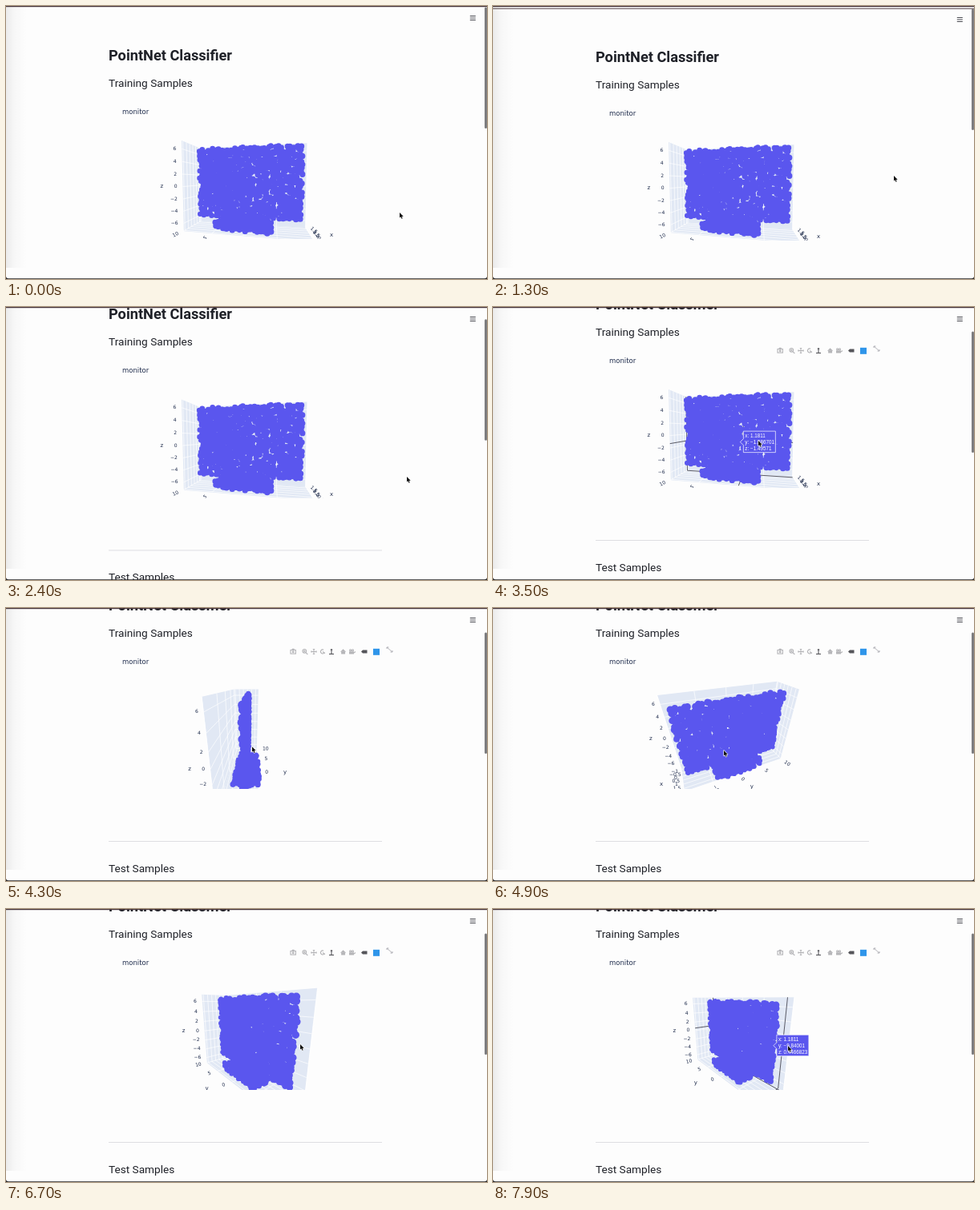
An HTML page with a canvas for the animation above (8 s loop, 600x341 px).

```html
<!DOCTYPE html>
<html lang="en">
<head>
<meta charset="utf-8">
<title>PointNet Classifier</title>
<style>
html, body { margin: 0; width: 100%; height: 100%; overflow: hidden; background: #fdfdfd; }
canvas { display: block; width: 600px; height: 341px; }
</style>
</head>
<body>
<canvas id="stage"></canvas>
<script>
const W = 600, H = 341, LOOP = 8000;
const BLUE = '#5a56ee', INK = '#1f2c4c', HEAD = '#1f2128', EDGE = '#46343a';
const UI = 'Roboto, sans-serif', PLOT = '"DejaVu Sans", sans-serif', HOVER = '"Liberation Sans", sans-serif';

const canvas = document.getElementById('stage');
const ctx = canvas.getContext('2d');
const dpr = window.devicePixelRatio || 1;
canvas.width = W * dpr;
canvas.height = H * dpr;

// Motion

function ease(t, from, to) {
  const k = Math.min(1, Math.max(0, (t - from) / (to - from)));
  return k * k * (3 - 2 * k);
}

const mix = (a, b, k) => a.map((v, i) => v + (b[i] - v) * k);

// Runs through steps of { from, to, pose }, easing from pose to pose
const follow = (t, start, steps) =>
  steps.reduce((pose, s) => mix(pose, s.pose, ease(t, s.from, s.to)), start);

const scrollAt = t => 65 * ease(t, 1800, 2635) - 2 * (ease(t, 800, 1000) - ease(t, 1600, 1800));

const DRAG = { from: 3600, to: 4900 }, BACK = { from: 5000, to: 6700 };

const cursorAt = t => follow(t, [491, 258], [
  { from: 100, to: 600, pose: [500, 212] },
  { from: 2700, to: 3400, pose: [331, 167] },
  { ...DRAG, pose: [288, 178] },
  { ...BACK, pose: [367, 169] },
  { from: 7100, to: 7500, pose: [368, 171] }
]);

// turn and tilt in degrees, eye distance
const eyeAt = t => follow(t, [11, 3, 23.2], [
  { ...DRAG, pose: [157, 35, 23.2] },
  { ...BACK, pose: [50, 14, 23.2] },
  { from: 7100, to: 7600, pose: [50, 16, 26] }
]);

const HOVERS = [
  { from: 3250, to: 3650, u: 1.3, z: -1.3, lines: ['x: 1.1811', 'y: −1.386701', 'z: −1.49571'] },
  { from: 7400, to: 8000, u: 9, z: 0.6, lines: ['x: 1.1811', 'y: −9.84001', 'z: 0.4466823'] }
];

// Point cloud: u runs along the screen, v is depth, z is up

let seed = 11;
const rand = () => (seed = (seed * 16807) % 2147483647) / 2147483647;
const jitter = a => (rand() * 2 - 1) * a;
const cloud = [];

function plate([u0, u1], [v0, v1], [z0, z1], step, loss) {
  for (let u = u0; u <= u1 + 0.01; u += step)
    for (let v = v0; v <= v1 + 0.01; v += step)
      for (let z = z0; z <= z1 + 0.01; z += step) {
        const p = [u + jitter(0.24), v + jitter(0.15), z + jitter(0.24)];
        if (rand() >= loss) cloud.push(p);
      }
}
plate([-8.7, 8.7], [0, 0], [-5.2, 6.5], 0.58, 0.025);
plate([-3.6, 3.8], [0, 0.5], [-6.7, -5.3], 0.5, 0);
plate([-3.6, 4], [-2, 2.2], [-6.9, -6.9], 0.5, 0);
plate([-5, -4.2], [-1.8, 1.8], [-6.8, -6.2], 0.5, 0);

// Plot box

const BU = 9.9, V0 = -2, V1 = 3.4, BZ = 7.3;

function viewAt(t) {
  const [turn, tilt, dist] = eyeAt(t);
  const a = turn * Math.PI / 180, b = tilt * Math.PI / 180;
  const sa = Math.sin(a), ca = Math.cos(a), sb = Math.sin(b), cb = Math.cos(b);
  const P = (u, v, z) => {
    const near = u * sa + v * ca;
    const s = 169 / (dist - near * cb - z * sb);
    return [301 + s * (u * ca - v * sa), 160 - s * (z * cb - near * sb), s];
  };
  const farU = sa > 0 ? -BU : BU, farV = ca > 0 ? V0 : V1;
  return { P, ca, farU, farV, nearU: -farU, nearV: V0 + V1 - farV };
}

function path(pts, x = 0, y = 0) {
  ctx.beginPath();
  pts.forEach(p => ctx.lineTo(x + p[0], y + p[1]));
}

function line(a, b) {
  path([a, b]);
  ctx.stroke();
}

function poly(pts, x, y) {
  path(pts, x, y);
  ctx.closePath();
  ctx.fill();
}

function label(s, x, y, angle = 0, align = 'center') {
  ctx.save();
  ctx.translate(x, y);
  ctx.rotate(angle);
  ctx.textAlign = align;
  ctx.fillText(s, 0, 0);
  ctx.restore();
}

function text(s, x, y, font, color) {
  ctx.font = font;
  ctx.fillStyle = color;
  ctx.fillText(s, x, y);
}

const num = n => String(n).replace('-', '−');

function drawWalls({ P, farU, farV }) {
  ctx.fillStyle = '#e1e8f4';
  poly([P(farU, V0, -BZ), P(farU, V1, -BZ), P(farU, V1, BZ), P(farU, V0, BZ)]);
  poly([P(-BU, farV, -BZ), P(BU, farV, -BZ), P(BU, farV, BZ), P(-BU, farV, BZ)]);
  poly([P(-BU, V0, -BZ), P(BU, V0, -BZ), P(BU, V1, -BZ), P(-BU, V1, -BZ)]);
  ctx.strokeStyle = 'rgba(255,255,255,.85)';
  ctx.lineWidth = 0.8;
  for (let z = -6; z <= 6; z += 2) {
    line(P(farU, V0, z), P(farU, V1, z));
    line(P(-BU, farV, z), P(BU, farV, z));
  }
  for (let u = -10; u <= 10; u += 5) {
    line(P(u, farV, -BZ), P(u, farV, BZ));
    line(P(u, V0, -BZ), P(u, V1, -BZ));
  }
  for (let v = V0 + 0.6; v < V1; v += 0.9) {
    line(P(farU, v, -BZ), P(farU, v, BZ));
    line(P(-BU, v, -BZ), P(BU, v, -BZ));
  }
}

// Point on a floor edge with the direction that leads out of the box
function outward(inner, edge) {
  const dx = edge[0] - inner[0], dy = edge[1] - inner[1], d = Math.hypot(dx, dy) || 1;
  return { x: edge[0], y: edge[1], dx: dx / d, dy: dy / d };
}

function drawAxes({ P, ca, farU, farV, nearU, nearV }) {
  const sides = [[farU, nearV], [nearU, farV]];
  const left = sides.sort((a, b) => P(...a, 0)[0] - P(...b, 0)[0])[0];
  const onY = u => outward(P(u, farV, -BZ), P(u, nearV, -BZ));
  const onX = v => outward(P(farU, v, -BZ), P(nearU, v, -BZ));
  ctx.fillStyle = INK;
  ctx.textBaseline = 'middle';

  ctx.font = '6px ' + PLOT;
  for (let z = -6; z <= 6; z += 2) {
    const p = P(...left, z);
    label(num(z), p[0] - 7, p[1], 0, 'right');
  }
  for (let y = -10; y <= 10; y += 5) {
    const e = onY(-y);
    label(num(y), e.x + e.dx * 11, e.y + e.dy * 9, Math.atan(e.dy / (e.dx || 0.01)) * 0.8);
  }
  for (let x = -1; x <= 1.5; x += 0.5) {
    const e = onX(1.4 - x * 1.6);
    label(num(x), e.x + e.dx * 9, e.y + e.dy * 8, 0.75 * Math.max(0, ca));
  }

  ctx.font = '7px ' + PLOT;
  const z = P(...left, 0), x = onX(0.7), y = onY(0);
  label('z', z[0] - 26, z[1]);
  label('x', x.x + x.dx * 28, x.y + x.dy * 22);
  label('y', y.x + y.dx * 34, y.y + y.dy * 20);
  ctx.textBaseline = 'alphabetic';
}

function drawSpikes({ P, farU, farV }, { u, z }) {
  const v = V0 + 0.3;
  ctx.strokeStyle = '#4a4a55';
  ctx.lineWidth = 0.9;
  line(P(farU, V0, z), P(farU, V1, z));
  line(P(farU, v, -BZ), P(farU, v, BZ));
  line(P(-BU, v, -BZ), P(BU, v, -BZ));
  line(P(u, V0, -BZ), P(u, V1, -BZ));
  line(P(u, farV, -BZ), P(u, farV, BZ));
  line(P(-BU, farV, z), P(BU, farV, z));
}

function drawHover({ P }, h) {
  const [px, py] = P(h.u, 0, h.z);
  const x = px + 2, y = py - 1;
  ctx.fillStyle = BLUE;
  poly([[-4, 0], [0, -4], [0, -13.5], [40, -13.5], [40, 13], [0, 13], [0, 4]], x, y);
  ctx.strokeStyle = '#fff';
  ctx.lineWidth = 0.7;
  ctx.stroke();
  h.lines.forEach((s, i) => text(s, x + 2, y - 5.6 + i * 8.2, '6.3px ' + HOVER, '#fff'));
}

function drawScene(t) {
  const view = viewAt(t);
  const hover = HOVERS.find(h => t >= h.from && t < h.to);
  ctx.save();
  ctx.beginPath();
  ctx.rect(145, 86, 307, 140);
  ctx.clip();
  drawWalls(view);
  drawAxes(view);
  if (hover) drawSpikes(view, hover);
  ctx.fillStyle = BLUE;
  ctx.beginPath();
  for (const p of cloud) {
    const [x, y, s] = view.P(...p), r = 0.5 + 0.4 * s;
    ctx.moveTo(x + r, y);
    ctx.arc(x, y, r, 0, 7);
  }
  ctx.fill();
  if (hover) drawHover(view, hover);
  ctx.restore();
}

// Toolbar

function ring(x, y, r, from = 0, to = 6.3) {
  ctx.beginPath();
  ctx.arc(x, y, r, from, to);
  ctx.stroke();
}

function cross(x, y, r) {
  line([x - r, y], [x + r, y]);
  line([x, y - r], [x, y + r]);
}

function block(x, y, w, h) {
  ctx.fillRect(x - w / 2, y - h / 2, w, h);
}

function drawModebar() {
  const y = 54.5;
  ctx.lineWidth = 1.1;
  ctx.strokeStyle = ctx.fillStyle = '#b5b5b8';
  // snapshot
  block(358.2, y - 3, 3, 1.5);
  ctx.strokeRect(355, y - 2, 6.4, 4.6);
  ring(358.2, y + 0.3, 0.9);
  // zoom
  ring(372.3, y - 0.7, 2.3);
  cross(372.3, y - 0.7, 1.2);
  line([374, y + 1.2], [376.3, y + 3.5]);
  // pan
  cross(384, y, 3.5);
  for (const s of [-1, 1]) {
    block(384 + s * 3, y, 1, 2.4);
    block(384, y + s * 3, 2.4, 1);
  }
  // orbit
  ring(395, y, 2.5, 0.6, 5.2);
  line([395, y], [398, y + 2]);
  // home
  poly([[-3.6, 0.3], [0, -3.2], [3.6, 0.3]], 420.6, y);
  block(420.6, y + 1.5, 4.9, 3);
  // last view
  block(431, y + 1.4, 6, 3.2);
  for (const x of [429.6, 432.5]) ring(x, y - 1.7, 1);
  line([434, y + 1.5], [436, y]);
  // turntable
  ctx.strokeStyle = ctx.fillStyle = '#55555a';
  line([406, y - 3.5], [406, y + 3]);
  line([403, y + 3], [409, y + 3]);
  block(406, y - 2.3, 2.4, 1.2);
  // tag
  poly([[-4, 0], [-2, -2], [3.5, -2], [3.5, 2], [-2, 2]], 447, y);
  ctx.fillStyle = '#2f95ea';
  block(462, y + 0.3, 8, 8);
  // expand
  ctx.strokeStyle = '#aaaab0';
  ctx.lineWidth = 0.9;
  for (const s of [-1, 1]) {
    path([[s, 3 * s], [3.5 * s, 3 * s], [3.5 * s, s]], 478.5, 52);
    ctx.stroke();
  }
  line([475, 49], [482, 55]);
}

// Page and window

function drawPage(t, scroll) {
  ctx.save();
  ctx.translate(0, -scroll);
  text('PointNet Classifier', 128, 67.7, 'bold 18.2px ' + UI, HEAD);
  text('Training Samples', 128, 101, '13.65px ' + UI, HEAD);
  text('monitor', 145, 134.7, '8.5px ' + PLOT, INK);
  text('Test Samples', 128, 395, '13.65px ' + UI, HEAD);
  ctx.fillStyle = '#dedee2';
  ctx.fillRect(128, 356, 341, 1);
  ctx.translate(0, 65);
  drawScene(t);
  if (t >= 2950) drawModebar();
  ctx.restore();
}

function drawBackdrop() {
  ctx.fillStyle = '#262628';
  ctx.fillRect(0, 0, W, H);
  ctx.fillStyle = '#fdfdfd';
  ctx.beginPath();
  ctx.roundRect(0, 0, W, H - 0.8, [0, 0, 3, 3]);
  ctx.fill();
  const shade = ctx.createLinearGradient(0, 0, 26, 0);
  shade.addColorStop(0, 'rgba(0,0,0,.07)');
  shade.addColorStop(0.4, 'rgba(0,0,0,.025)');
  shade.addColorStop(1, 'rgba(0,0,0,0)');
  ctx.fillStyle = shade;
  ctx.fillRect(0, 0, 26, 327);
}

function drawChrome(t, scroll) {
  const push = Math.max(0, -scroll);
  ctx.strokeStyle = '#4a4b52';
  ctx.lineWidth = 1;
  for (const dy of [-2.5, 0, 2.5]) line([578.8, 15 + push + dy], [585.8, 15 + push + dy]);

  // the thumb lags behind the page
  const thumb = Math.max(0, scrollAt(t - 200)) * 0.448;
  ctx.fillStyle = '#7d7d7f';
  ctx.beginPath();
  ctx.roundRect(597, 1.5 + push + thumb, 3, 151.5, 1.5);
  ctx.fill();

  ctx.fillStyle = EDGE;
  ctx.fillRect(0, 0, W, 1.2);
  if (push > 0.5) ctx.fillRect(0, push + 0.8, W, 0.9);
}

function drawCursor(x, y) {
  ctx.lineJoin = 'round';
  ctx.strokeStyle = '#fff';
  ctx.fillStyle = '#111';
  ctx.lineWidth = 1.2;
  path([[0, 0], [0, 6.6], [1.5, 5.3], [2.5, 7.8], [3.7, 7.3], [2.7, 4.9], [4.7, 4.8]], x, y);
  ctx.closePath();
  ctx.stroke();
  ctx.fill();
  ctx.lineJoin = 'miter';
}

function draw() {
  const t = performance.now() % LOOP, scroll = scrollAt(t);
  ctx.setTransform(dpr, 0, 0, dpr, 0, 0);
  drawBackdrop();
  drawPage(t, scroll);
  drawChrome(t, scroll);
  drawCursor(...cursorAt(t));
  requestAnimationFrame(draw);
}
draw();
</script>
</body>
</html>
```
